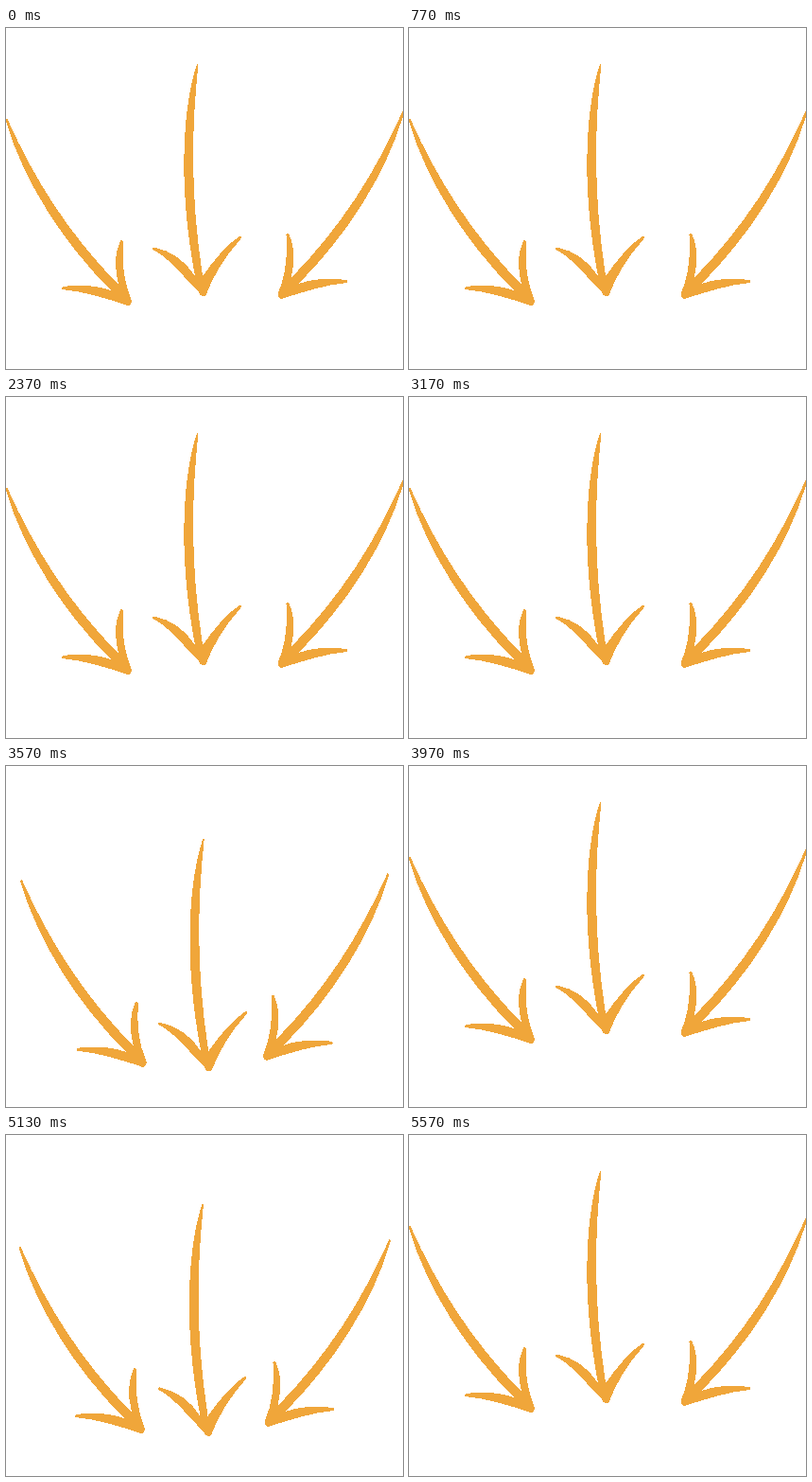
Animation of 420 by 360 pixels, one loop 5.61 s. Source, as an HTML page:

```html
<!DOCTYPE html>
<html lang="en">
<head>
<meta charset="utf-8">
<title>Three arrows</title>
<style>
  html, body { margin: 0; width: 100%; height: 100%; overflow: hidden; background: #fff; }
  svg { display: block; width: 420px; height: 360px; fill: #f0a63a; shape-rendering: crispEdges; }
</style>
</head>
<body>
<svg viewBox="0 0 420 360">
  <defs>
    <path id="side" d="M-.5 97 L1 95 C30 160 66 217 119 271 C114 250 116 236 121 225 Q122.500 223 124 225.500
      C122.500 248 124.500 268 133 288 C132.500 293 129 294 126 292 C104 285 82 278 60 276 Q58 275 60 273
      C80 270.500 96 272 111 277 C60 226 18 161 -.5 97Z"/>
  </defs>
  <g id="left"><use href="#side"/></g>
  <g id="middle">
    <path d="M202 38 C188.500 78 180.500 160 200 262 C190 246 175 235 156.500 231.500 Q154 232 155.500 234
      C172 242 189 264 204 279 C205 284 211 284 212 281 C219 262 231 242 248.500 222.500 Q250 219 247 220
      C234 228 220 245 208 262 C194 170 197 100 203.500 38Z"/>
  </g>
  <g id="right"><use href="#side" transform="translate(420.5 -7) scale(-1 1)"/></g>
</svg>
<script>
  const LOOP = 5610, LAST_TICK = 167;
  // Offset of each arrow at full reach
  const reach = { left: [15.75, 24.75], middle: [6.2, 39.2], right: [-15.75, 24.75] };
  const arrows = Object.entries(reach).map(([id, by]) => [document.getElementById(id), by]);

  // 20 poses per bounce, spread over 24 ticks: every sixth tick repeats a pose
  function reachAt(ms) {
    const t = Math.floor(ms / 10) * 10;
    const tick = Math.min(LAST_TICK, Math.floor((t + 5) * 0.03));
    const k = (tick + 1) % 24;
    const pose = k - Math.floor((k + 4) / 6);
    if (pose <= 1) return 0;
    return pose <= 10 ? (pose - 1) / 9 : (20 - pose) / 10;
  }

  const start = performance.now();
  function draw() {
    const p = reachAt((performance.now() - start) % LOOP);
    for (const [el, [dx, dy]] of arrows) {
      el.setAttribute("transform", `translate(${dx * p} ${dy * p})`);
    }
    requestAnimationFrame(draw);
  }
  draw();
</script>
</body>
</html>
```
